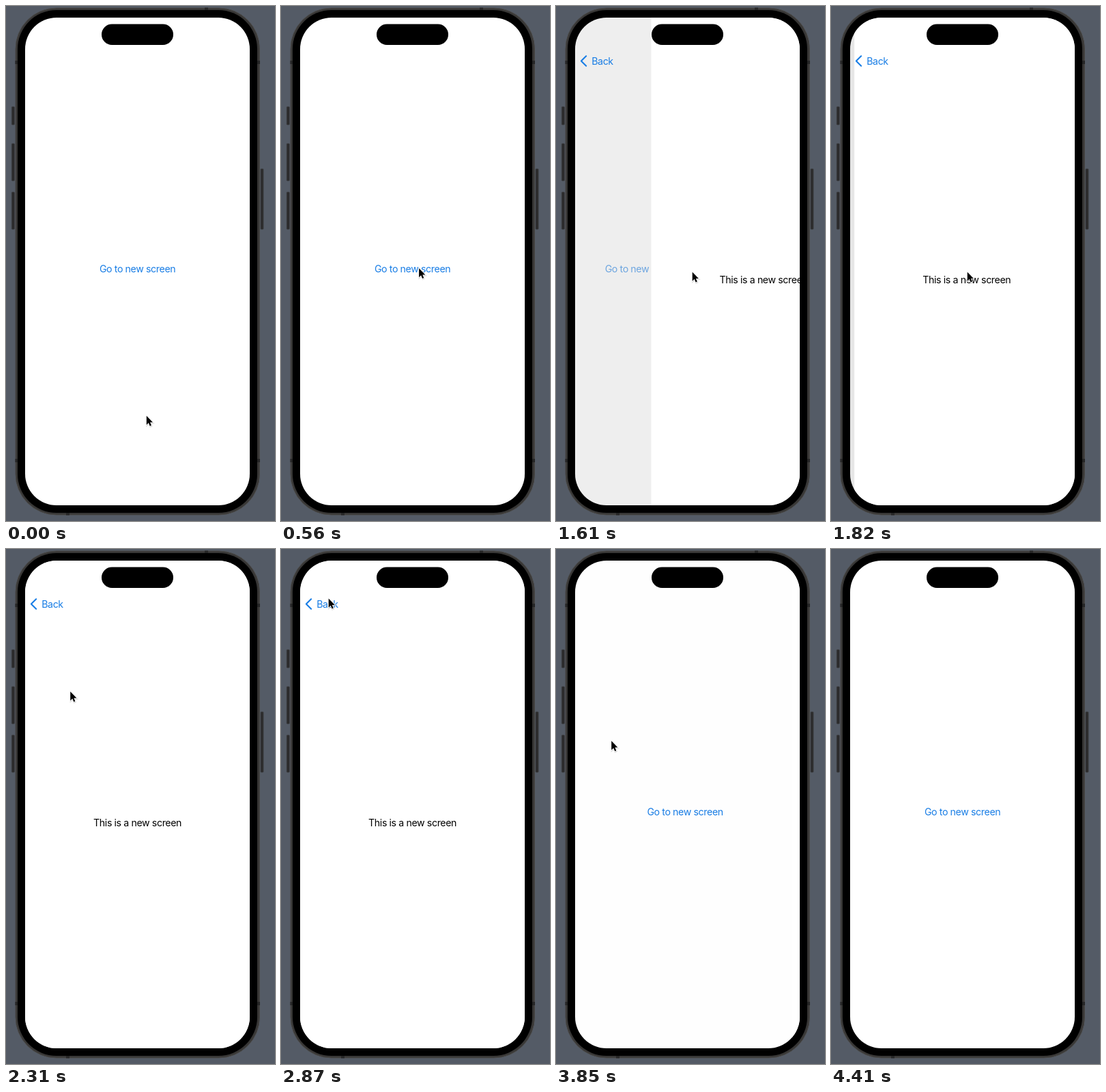
Recreate the animation shown at these times as an HTML page. Size 394x754 px, loop 4830 ms.

```html
<!DOCTYPE html>
<html lang="en">
<head>
<meta charset="utf-8">
<title>Screen navigation</title>
<style>
  html, body { margin: 0; width: 100%; height: 100%; overflow: hidden; background: #545b66; }
  svg { display: block; width: 394px; height: 754px; }
  text { font: 14.2px Inter, sans-serif; letter-spacing: -.4px; }
  .middle { text-anchor: middle; }
  .link { fill: #187de5; }
  .page { x: 28px; y: 17px; width: 329px; height: 714px; }
</style>
</head>
<body>
<svg viewBox="0 0 394 754">
  <defs>
    <clipPath id="clip"><rect class="page" rx="46"/></clipPath>
    <path id="arrow" d="M0 0V13.2L3 10.3L5 15L7.1 14.1L5.2 9.5H9.2Z"/>
  </defs>

  <g fill="#2b2b2c" stroke="#3d3e41" stroke-width=".8">
    <rect x="8.4" y="147.4" width="4" height="26.5" rx="1"/>
    <rect x="8.4" y="201.4" width="4" height="54.5" rx="1"/>
    <rect x="8.4" y="272.4" width="4" height="54.5" rx="1"/>
    <rect x="373" y="238.4" width="4" height="88.5" rx="1"/>
  </g>
  <rect x="14" y="3" width="357.5" height="742" rx="60" fill="#383736" stroke="#4a4947"/>
  <g fill="#262626">
    <rect x="13.5" y="80" width="4" height="5"/><rect x="368" y="80" width="4" height="5"/>
    <rect x="13.5" y="663" width="4" height="5"/><rect x="368" y="663" width="4" height="5"/>
    <rect x="291" y="2.5" width="5" height="4"/><rect x="88" y="741" width="5" height="4.5"/>
  </g>
  <rect x="17" y="6" width="351" height="736" rx="57"/>

  <g clip-path="url(#clip)">
    <rect class="page" fill="#fff"/>
    <g id="home"><text id="go" class="middle link" x="192.6" y="390">Go to new screen</text></g>
    <rect id="dim" class="page"/>
    <g id="detail">
      <rect class="page" fill="#fff"/>
      <text class="middle" x="192.6" y="406">This is a new screen</text>
    </g>
    <g id="back">
      <path d="M44.2 73.3L36.9 80.5L44.2 87.7" fill="none" stroke="#187de5" stroke-width="2.1" stroke-linecap="round" stroke-linejoin="round"/>
      <text class="link" x="52.2" y="85.6">Back</text>
    </g>
  </g>
  <rect x="140" y="26.5" width="105" height="30.5" rx="15.2"/>

  <circle id="ring" r="20" fill="none" stroke="#000" stroke-width="3"/>
  <g id="cursor">
    <use href="#arrow" x=".4" y="1" stroke="#000" stroke-width="2" opacity=".14"/>
    <use href="#arrow" stroke="#fff" stroke-width="1.6" paint-order="stroke"/>
  </g>
</svg>
<script>
const LOOP = 4830, STEP = 70, WIDTH = 329;
const PUSH = 1479, POP = 3552;

// Pointer strokes: each eases from where the last one ended; bow bends it sideways.
const HOME = { x: 205.8, y: 600 };
const strokes = [
  { from: 0, to: 420, x: 209, y: 368, bow: 24 },
  { from: 420, to: 630, x: 199.7, y: 389.5 },
  { from: 1820, to: 2100, x: 98, y: 243 },
  { from: 2170, to: 2590, x: 83.5, y: 111 },
  { from: 2660, to: 2870, x: 69.7, y: 72.5 },
  { from: 3010, to: 3290, x: 66.7, y: 79.5 },
  { from: 3570, to: 4350, x: 116, y: 765 }
];

const ramp = (t, from, to) => Math.min(1, Math.max(0, (t - from) / (to - from)));
const ease = k => k * k * (3 - 2 * k);

function pointerAt(t) {
  let { x, y } = HOME;
  for (const s of strokes) {
    const k = ease(ramp(t, s.from, s.to));
    x += (s.x - x) * k + (s.bow || 0) * Math.sin(Math.PI * k);
    y += (s.y - y) * k;
  }
  return { x, y };
}

// Critically damped spring from 0 to 1.
function spring(ms) {
  const q = Math.max(0, ms) * .0173;
  return 1 - (1 + q) * Math.exp(-q);
}

const el = id => document.getElementById(id);
const move = (id, x, y = 0) => el(id).setAttribute('transform', `translate(${x} ${y})`);
const fade = (id, opacity) => el(id).setAttribute('opacity', opacity);

function draw(time) {
  const t = Math.floor(time % LOOP / STEP) * STEP;
  const shown = spring(t - PUSH) - spring(t - POP);
  const offset = WIDTH * (1 - shown);
  const { x, y } = pointerAt(t);
  const pressed = (t >= 1330 && t < 1470) || (t >= 3430 && t < 3570);

  move('home', -.3 * WIDTH * shown);
  move('detail', offset);
  move('back', t < POP ? 0 : offset);
  fade('dim', .1 * shown);
  fade('go', t < 1470 ? 1 : .2 + .8 * ramp(t, 1470, 1750));
  fade('back', ramp(t, 1470, 1610) * (1 - ramp(t, 3430, 3610)));
  move('cursor', x, y);
  move('ring', x + .3, y + .5);
  fade('ring', pressed ? 1 : 0);
}

const start = performance.now();
function tick() {
  draw(performance.now() - start);
  requestAnimationFrame(tick);
}
tick();
</script>
</body>
</html>
```
